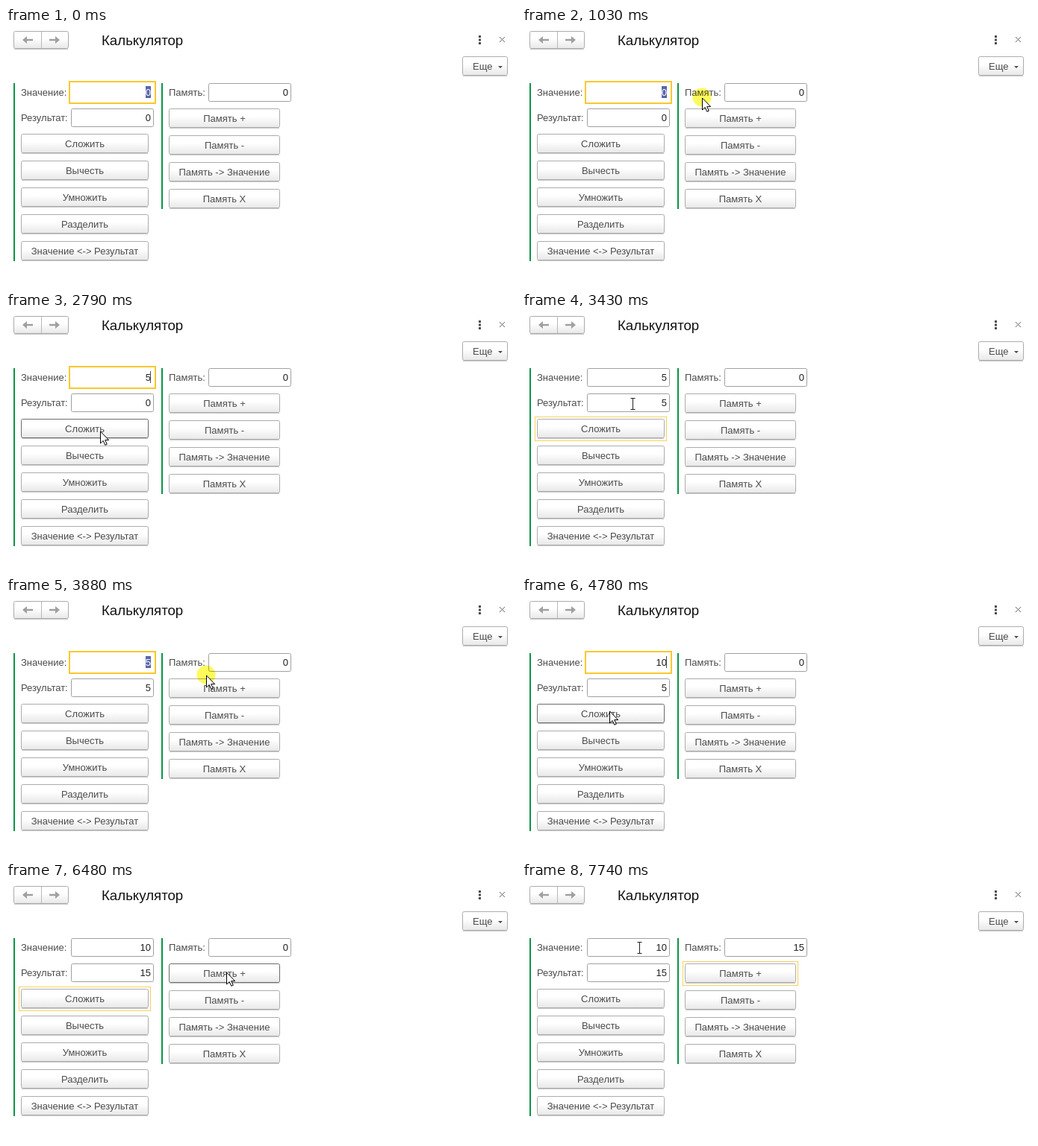
An HTML page that plays this animation: 683 by 345 pixels, repeating every 8 s.

```html
<!DOCTYPE html>
<html lang="ru">
<head>
<meta charset="utf-8">
<style>
html, body { margin: 0; height: 100%; overflow: hidden; background: #fff; }
svg { display: block; width: 683px; height: 345px; font: 13px "Liberation Sans", Arial, sans-serif; fill: #4c4c4c; }
.btn { fill: url(#face); stroke: #acacac; }
.btn.hover { stroke: #6c6c6c; }
.shade { fill: #c8c8c8; }
.field { fill: #fff; stroke: #a0a0a0; }
.num { fill: #222; text-anchor: end; }
.mid { text-anchor: middle; }
.focus { fill: none; stroke: #f8d05a; }
.ring { fill: #fff; stroke: #fac82d; stroke-width: 2; }
.bar { fill: #0a9448; }
.press { fill: #fdfb5c; mix-blend-mode: multiply; }
</style>
</head>
<body>
<svg id="stage" viewBox="0 0 683 345">
  <defs>
    <linearGradient id="face" x1="0" y1="0" x2="0" y2="1">
      <stop offset=".4" stop-color="#fff"/>
      <stop offset="1" stop-color="#e8e8e8"/>
    </linearGradient>
  </defs>
</svg>
<script>
const LOOP = 8000;
const stage = document.getElementById('stage');

function add(tag, attrs, text) {
  const el = document.createElementNS('http://www.w3.org/2000/svg', tag);
  for (const key in attrs) el.setAttribute(key, attrs[key]);
  if (text) el.textContent = text;
  stage.append(el);
  return el;
}
const label = (x, y, text, cls = '') => add('text', { x, y, class: cls }, text);
const rect = (x, y, width, height, cls) => add('rect', { x, y, width, height, class: cls });
const outline = (x, y, w, h, cls, rx = 2) =>
  add('rect', { x: x + .5, y: y + .5, width: w - 1, height: h - 1, rx, class: cls });
const show = (el, on) => el.setAttribute('visibility', on ? 'visible' : 'hidden');
const inside = ([x, y], r) => x >= r.x && x < r.x + r.w && y >= r.y && y < r.y + r.h;

function panel(x, y, w, h) {
  rect(x + 1, y + h - 1, w - 2, 1, 'shade');
  return outline(x, y, w, h - 1, 'btn');
}
function button(x, y, w, text) {
  const el = panel(x, y, w, 27);
  label(x + w / 2, y + 18, text, 'mid');
  return { x, y, w, h: 27, el };
}
function field(x, y, name, nameX) {
  label(nameX, y + 17, name);
  return { x, y, w: 111, h: 25, el: outline(x, y, 111, 25, 'field') };
}
const number = f => label(f.x + 107, f.y + 17, '0', 'num');
const focusBox = b => outline(b.x - 3, b.y - 3, b.w + 6, b.h + 6, 'focus', 0);

// Header
panel(10, 4, 74, 25);
add('path', { d: 'M47.5 5v22', stroke: '#b8b8b8' });
add('path', { d: 'M22 16l6-5v3.7h8v2.6h-8V21zM72 16l-6-5v3.7h-8v2.6h8V21z', fill: '#a0a0a0' });
add('text', { x: 128, y: 23, 'font-size': 18.67, fill: '#111' }, 'Калькулятор');
for (let i = 0; i < 3; i++) rect(633, 10 + 4.5 * i, 3, 3);
add('path', { d: 'M661 12l7 7m0-7l-7 7', stroke: '#666' });
panel(611, 38, 61, 27);
label(625, 56, 'Еще');
add('path', { d: 'M659 51h6l-3 3z' });

// Form
rect(10, 74, 2, 239, 'bar');
rect(208, 74, 2, 169, 'bar');
const fields = [
  field(87, 74, 'Значение:', 20),
  field(87, 108, 'Результат:', 20),
  field(271, 74, 'Память:', 218)
];
const ring = rect(85, 72, 115, 29, 'ring');
const selection = rect(187, 78, 7, 16);
selection.style.fill = '#5a66aa';
const [value, result, memory] = fields.map(number);
const caret = rect(193, 78, 1, 16);
const column = (x, y, w, names) => names.map((name, i) => button(x, y + 36 * i, w, name));
const sums = column(20, 142, 171, ['Сложить', 'Вычесть', 'Умножить', 'Разделить', 'Значение <-> Результат']);
const stores = column(218, 108, 149, ['Память +', 'Память -', 'Память -> Значение', 'Память X']);
const sumFocus = focusBox(sums[0]);
const storeFocus = focusBox(stores[0]);

// Pointer
const press = add('circle', { r: 12.5, class: 'press' });
const arrow = add('path', { d: 'M.5 1v16l3.7-3.5 2.6 5.8 2.5-1.1-2.6-5.6h5z', fill: '#fff', stroke: '#000' });
const beam = add('path', { d: 'M-2.5-7.5h6M-2.5 7.5h6M.5-7.5v15', stroke: '#222' });

const moves = [
  { from: 90, to: 800, at: [161, 82] },
  { from: 900, to: 1260, at: [295, 100] },
  { from: 2230, to: 2800, at: [126, 158] },
  { from: 3320, to: 3650, at: [165, 93] },
  { from: 3760, to: 3950, at: [284, 105] },
  { from: 4300, to: 4780, at: [117, 151] },
  { from: 4800, to: 5010, at: [124, 154] },
  { from: 5910, to: 6480, at: [295, 119] },
  { from: 7330, to: 7740, at: [157, 87] }
];
// Each step keeps what the earlier ones have set.
const steps = [
  { at: 0, focus: 'value', value: '0', result: '0', memory: '0', selected: true },
  { at: 830, press: true, selected: false },
  { at: 950, selected: true },
  { at: 1290, press: false },
  { at: 1900, value: '5', selected: false, caret: true },
  { at: 3190, press: true },
  { at: 3220, focus: 'sum', result: '5', caret: false },
  { at: 3290, press: false },
  { at: 3700, press: true, focus: 'value' },
  { at: 3820, selected: true },
  { at: 3940, press: false },
  { at: 4180, value: '1', selected: false, caret: true },
  { at: 4320, value: '10' },
  { at: 5240, press: true },
  { at: 5270, focus: 'sum', result: '15', caret: false },
  { at: 5310, press: false },
  { at: 6740, press: true },
  { at: 6830, focus: 'store', memory: '15' },
  { at: 6930, press: false }
];

function pointer(t) {
  let p = [618, 331];
  for (const { from, to, at } of moves) {
    const rest = 1 - Math.min(1, Math.max(0, (t - from) / (to - from)));
    p = p.map((v, i) => at[i] + (v - at[i]) * rest ** 2);
  }
  return p.map(Math.round);
}

function draw(t) {
  const s = Object.assign({}, ...steps.filter(step => step.at <= t));
  show(ring, s.focus === 'value');
  show(fields[0].el, s.focus !== 'value');
  show(sumFocus, s.focus === 'sum');
  show(storeFocus, s.focus === 'store');
  show(selection, s.selected && s.focus === 'value');
  show(caret, s.caret);
  value.textContent = s.value;
  value.style.fill = s.selected ? '#fff' : '';
  result.textContent = s.result;
  memory.textContent = s.memory;

  const visible = t >= moves[0].from;
  const p = pointer(t);
  const overField = fields.some(f => inside(p, f));
  for (const b of [...sums, ...stores]) b.el.classList.toggle('hover', inside(p, b));
  for (const el of [press, arrow, beam]) el.setAttribute('transform', `translate(${p})`);
  show(press, s.press);
  show(arrow, visible && !overField);
  show(beam, visible && overField);
}

const start = performance.now();
function frame() {
  draw((performance.now() - start) % LOOP);
  requestAnimationFrame(frame);
}
frame();
</script>
</body>
</html>
```
